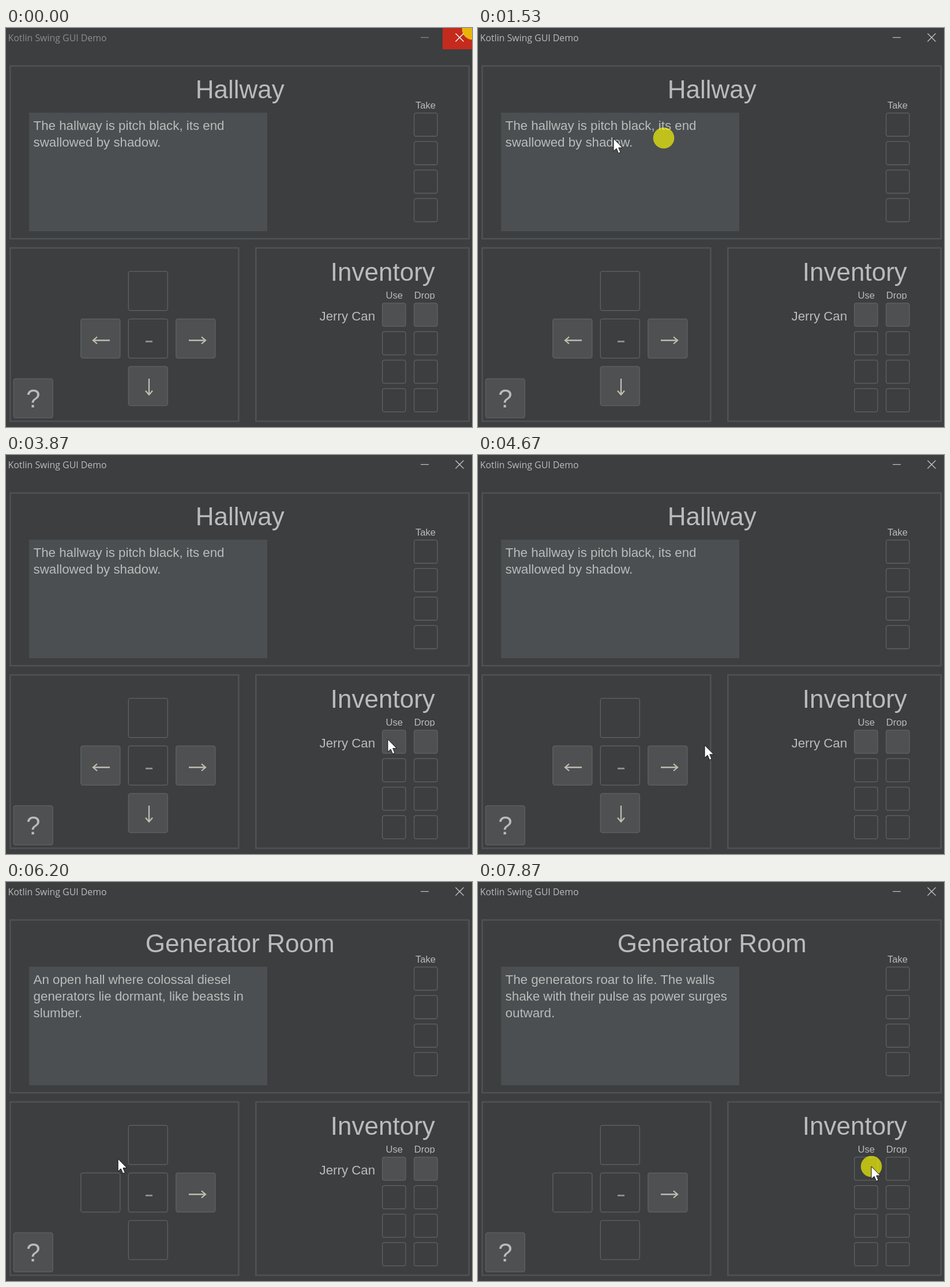
An HTML page that plays this animation: 808 by 693 pixels, repeating every 8 s.

```html
<!DOCTYPE html>
<html lang="en">
<head>
<meta charset="utf-8">
<title>Kotlin Swing GUI Demo</title>
<style>
  html, body { margin: 0; width: 100%; height: 100%; overflow: hidden; background: #3c3e40; }
  svg { display: block; width: 808px; height: 693px; }
  text { font-family: "Liberation Sans", Arial, sans-serif; fill: #bbb; white-space: pre; }
  .head { font-size: 44px; }
  .body { font-size: 22.3px; }
  .label { font-size: 16.6px; }
  .caption { font: 15.9px "Open Sans", "Noto Sans", sans-serif; }
  .mid { text-anchor: middle; }
  .panel { fill: none; stroke: #4f5254; stroke-width: 2.6; }
  .btn { fill: none; stroke: #606264; stroke-width: 1.3; }
  .btn.on { fill: #4e5052; }
  .arrow { fill: none; stroke: #c0bdb0; stroke-width: 2.3; }
</style>
</head>
<body>
<svg viewBox="0 0 808 693">
  <defs>
    <clipPath id="labelClip"><rect x="640" y="450" width="120" height="21.5"/></clipPath>
  </defs>
  <rect width="808" height="693" fill="#3c3e40"/>
  <text id="caption" class="caption" x="3.5" y="23">Kotlin Swing GUI Demo</text>
  <rect id="closeHover" x="757" width="51" height="37" fill="#c42b1c"/>
  <path id="minimize" d="M719 16.5h14" stroke-width="1.2"/>
  <path id="close" d="M779.5 9.5l14 14m0-14l-14 14" fill="none" stroke-width="1.4"/>

  <rect class="panel" x="7.3" y="66" width="795.5" height="300"/>
  <rect class="panel" x="7.3" y="382" width="396" height="301"/>
  <rect class="panel" x="433.3" y="382" width="369.5" height="301"/>

  <text id="room" class="head mid" x="405.7" y="122"></text>
  <rect x="40" y="147" width="413" height="206" fill="#4b4f51"/>
  <g id="story"></g>

  <text class="label mid" x="727.5" y="139.5">Take</text>
  <text class="head" x="562.8" y="438.5">Inventory</text>
  <g clip-path="url(#labelClip)">
    <text class="label mid" x="673.3" y="470">Use</text>
    <text class="label mid" x="725.8" y="470">Drop</text>
  </g>
  <text id="item" class="body" x="543.5" y="507.5">Jerry Can</text>

  <g id="buttons"></g>
  <path id="westArrow" class="arrow" d="M180 542.5H151m7-6l-7 6l7 6"/>
  <path class="arrow" d="M317 542.5H346m-7-6l7 6l-7 6"/>
  <path id="southArrow" class="arrow" d="M248 609V637m-6-7l6 7l6-7"/>
  <path d="M242 544.5h12" stroke="#8c8c8c" stroke-width="3"/>
  <text class="head mid" x="47.3" y="659">?</text>

  <circle id="press" r="18.3" fill="#ff0" fill-opacity=".65"/>
  <path id="cursor" d="M0 0V22L5 17.3L8.6 25.6L12.2 24L8.8 16H15.6Z" fill="#fff" stroke="#111"/>
</svg>
<script>
const $ = id => document.getElementById(id);
const LOOP = 8000, FPS = 15;

function add(parent, tag, attrs) {
  const el = document.createElementNS("http://www.w3.org/2000/svg", tag);
  for (const k in attrs) el.setAttribute(k, attrs[k]);
  return parent.appendChild(el);
}
const button = (x, y, size) =>
  add($("buttons"), "rect", { class: "btn", x, y, width: size, height: size, rx: 3.5 });
const pad = (col, row) => button(212.3 + col * 82.5, 505.3 + row * 82.6, 68);
const slots = (x, top) => [0, 1, 2, 3].map(i => button(x, top + i * 49.5, 40.4));

pad(0, 0);
pad(0, -1);
const west = pad(-1, 0), east = pad(1, 0), south = pad(0, 1);
const help = button(13.2, 609.2, 68);
slots(707.6, 147.6);
const [use] = slots(652.6, 477.8), [drop] = slots(707.6, 477.8);

const lines = [0, 1, 2].map(i => add($("story"), "text", { class: "body", x: 47.6, y: 177.4 + i * 28.7 }));
const scenes = [
  ["Hallway", "The hallway is pitch black, its end", "swallowed by shadow."],
  ["Generator Room", "An open hall where colossal diesel", "generators lie dormant, like beasts in", "slumber."],
  ["Generator Room", "The generators roar to life. The walls", "shake with their pulse as power surges", "outward."]
];

// Turning points of the pointer: seconds, x, y
const turns = [
  [0, 809, 2], [.6, 600, 190], [1.07, 388, 160], [22 / FPS, 322, 191], [23 / FPS, 235, 192],
  [1.67, 82, 206], [1.8, 262, 170], [2.53, 660, 510], [41 / FPS, 658.7, 493], [2.93, 668, 494],
  [3.67, 668, 494], [4.53, 566, 491], [70 / FPS, 393, 504], [4.93, 147, 554], [5.13, 156, 557],
  [5.6, 156, 557], [6.47, 232, 458], [104 / FPS, 643, 482], [7.07, 691, 490], [7.6, 682, 494], [8, 682, 494]
];

// Smooth curve through the turns that never overshoots them
function along(axis, t) {
  const i = Math.max(1, turns.findIndex(k => k[0] >= t));
  const rate = j => turns[j] && turns[j - 1]
    ? (turns[j][axis] - turns[j - 1][axis]) / (turns[j][0] - turns[j - 1][0]) : 0;
  const slope = j => {
    const a = rate(j), b = rate(j + 1);
    return a * b > 0 ? 2 * a * b / (a + b) : 0;
  };
  const p = turns[i - 1], q = turns[i], h = q[0] - p[0];
  const u = (t - p[0]) / h, v = 1 - u;
  return p[axis] * v * v * (1 + 2 * u) + q[axis] * u * u * (1 + 2 * v)
    + h * u * v * (slope(i - 1) * v - slope(i) * u);
}
const pointer = t => [along(1, Math.max(0, t)), along(2, Math.max(0, t))];

// Mouse button held: start and length in seconds
const holds = [[0, .13], [1.46, .13], [3.2, .06], [3.46, .06], [5.26, .2], [7.8, .2]];

const show = (el, on) => el.setAttribute("visibility", on ? "visible" : "hidden");
const move = (el, [x, y]) => el.setAttribute("transform", `translate(${x} ${y})`);

function draw(t) {
  const scene = t < 5.39 ? 0 : t < 7.86 ? 1 : 2;
  const [title, ...story] = scenes[scene];
  $("room").textContent = title;
  lines.forEach((el, i) => el.textContent = story[i] || "");

  const hall = scene === 0, carrying = scene < 2;
  [[west, hall], [south, hall], [east, true], [help, true], [use, carrying], [drop, carrying]]
    .forEach(([el, on]) => el.classList.toggle("on", on));
  show($("westArrow"), hall);
  show($("southArrow"), hall);
  show($("item"), carrying);

  const active = t > .13, tip = pointer(t);
  const hover = tip[0] >= 757 && tip[1] < 37;
  $("caption").style.fill = active ? "#bbb" : "#8b8c8d";
  $("minimize").setAttribute("stroke", active ? "#c4c4c4" : "#8b8c8d");
  $("close").setAttribute("stroke", hover ? "#fff" : "#c4c4c4");
  show($("closeHover"), hover);

  // The press marker trails the pointer by one step
  show($("press"), holds.some(([from, span]) => t >= from && t < from + span));
  move($("press"), pointer(t - 1 / FPS));
  move($("cursor"), tip);
}

let start, last = -1;
function loop(now) {
  start ??= now;
  const step = Math.floor((now - start + 5) % LOOP / 1000 * FPS);
  if (step !== last) draw((last = step) / FPS);
  requestAnimationFrame(loop);
}
draw(0);
requestAnimationFrame(loop);
</script>
</body>
</html>
```
